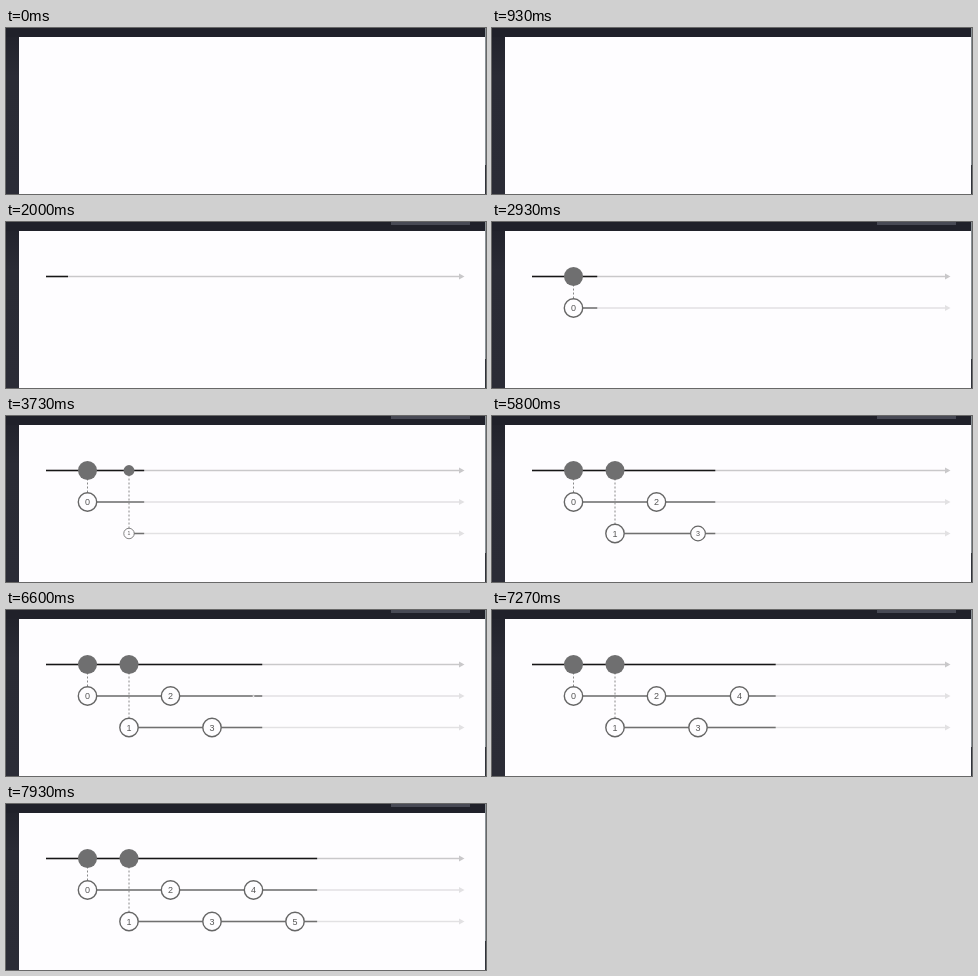
An HTML page for the animation above (8000 ms loop, 480x166 px).

```html
<!DOCTYPE html>
<html lang="en">
<head>
<meta charset="utf-8">
<title>Marble diagram</title>
<style>
  html, body { margin: 0; width: 100%; height: 100%; overflow: hidden; background: #fefdff; }
  svg { display: block; width: 480px; height: 166px; }
  text { font: 9px "Liberation Sans", Arial, sans-serif; text-anchor: middle; fill: #555; }
</style>
</head>
<body>
<svg id="stage" viewBox="0 0 480 166">
  <defs>
    <linearGradient id="side" x1="0" y1="0" x2="0" y2="1">
      <stop offset="0" stop-color="#22232c"/>
      <stop offset=".25" stop-color="#2a2b35"/>
      <stop offset="1" stop-color="#2b2c36"/>
    </linearGradient>
  </defs>
  <rect width="480" height="166" fill="#fefdff"/>
  <rect y="9" width="13" height="157" fill="url(#side)"/>
  <rect width="480" height="9" fill="#20212a"/>
  <rect x="479" width="1" height="137" fill="#8b9297"/>
  <rect x="479" y="137" width="1" height="29" fill="#30343b"/>
</svg>
<script>
const LOOP = 8000, FPS = 15;
const START = 1470, FIRST = 2515, SECOND = 1000, GROW = 400;
const ROWS = [54.5, 86, 117.5];
const LEFT = 40, RIGHT = 458.5, STEP = 41.5;
// time and x of the moving line end
const PATH = [[START, LEFT], [2000, 62], [2500, 87.4], [7930, 311], [LOOP, 314]];

const stage = document.getElementById('stage');
const parts = [];

function add(tag, attrs, parent = stage) {
  const el = document.createElementNS('http://www.w3.org/2000/svg', tag);
  for (const key in attrs) el.setAttribute(key, attrs[key]);
  parent.append(el);
  return el;
}

function showFrom(el, time) {
  parts.push(t => el.style.display = t >= time - 5 ? '' : 'none');
}

function track(row, x, time, light, dark) {
  const y = ROWS[row];
  const arrow = add('g', { fill: light, stroke: 'none' });
  add('path', { d: `M${x} ${y}H454`, stroke: light, 'stroke-width': 1.4 }, arrow);
  add('path', { d: `M453 ${y - 3}L${RIGHT} ${y}L453 ${y + 3}Z` }, arrow);
  showFrom(arrow, time);
  const line = add('path', { stroke: dark, 'stroke-width': 1.5 });
  showFrom(line, time);
  parts.push(t => line.setAttribute('d', `M${x} ${y}H${Math.max(x, headX(t))}`));
}

function link(x, row, time) {
  showFrom(add('path', {
    d: `M${x} ${ROWS[0]}V${ROWS[row]}`, stroke: '#888', 'stroke-dasharray': '2 2'
  }), time);
}

function marble(x, row, time, label) {
  const g = add('g', {});
  if (label === undefined) {
    add('circle', { r: 9.5, fill: '#6f6f70' }, g);
  } else {
    add('circle', { r: 9.2, fill: '#fefdff', stroke: '#666', 'stroke-width': 1.4 }, g);
    add('text', { y: 3.2 }, g).textContent = label;
  }
  parts.push(t => {
    const p = Math.min(1, Math.max(0, (t - time) / GROW));
    g.setAttribute('transform', `translate(${x} ${ROWS[row]}) scale(${p * p * (3 - 2 * p)})`);
  });
}

function headX(t) {
  if (t <= START) return LEFT;
  const i = PATH.findIndex(p => t <= p[0]);
  const [t0, x0] = PATH[i - 1], [t1, x1] = PATH[i];
  return x0 + (x1 - x0) * (t - t0) / (t1 - t0);
}

const eventX = n => 81.5 + n * STEP;
const eventTime = n => FIRST + n * SECOND;

showFrom(add('rect', { x: 385, width: 79, height: 3, fill: '#484a55' }), START);
track(0, LEFT, START, '#c9c8ca', '#161616');
for (const n of [0, 1]) {
  link(eventX(n), n + 1, eventTime(n));
  track(n + 1, eventX(n), eventTime(n), '#e2e1e3', '#707070');
  marble(eventX(n), 0, eventTime(n));
}
for (let n = 0; n < 6; n++) marble(eventX(n), n % 2 + 1, eventTime(n), n);

function draw(t) {
  const step = Math.floor((t + 5) * FPS / 1000) * 1000 / FPS;
  const shown = Math.min(step, LOOP - 1000 / FPS);
  parts.forEach(update => update(shown));
}

const begin = performance.now();
function tick(now) {
  draw(Math.max(0, now - begin) % LOOP);
  requestAnimationFrame(tick);
}
draw(0);
requestAnimationFrame(tick);
</script>
</body>
</html>
```
